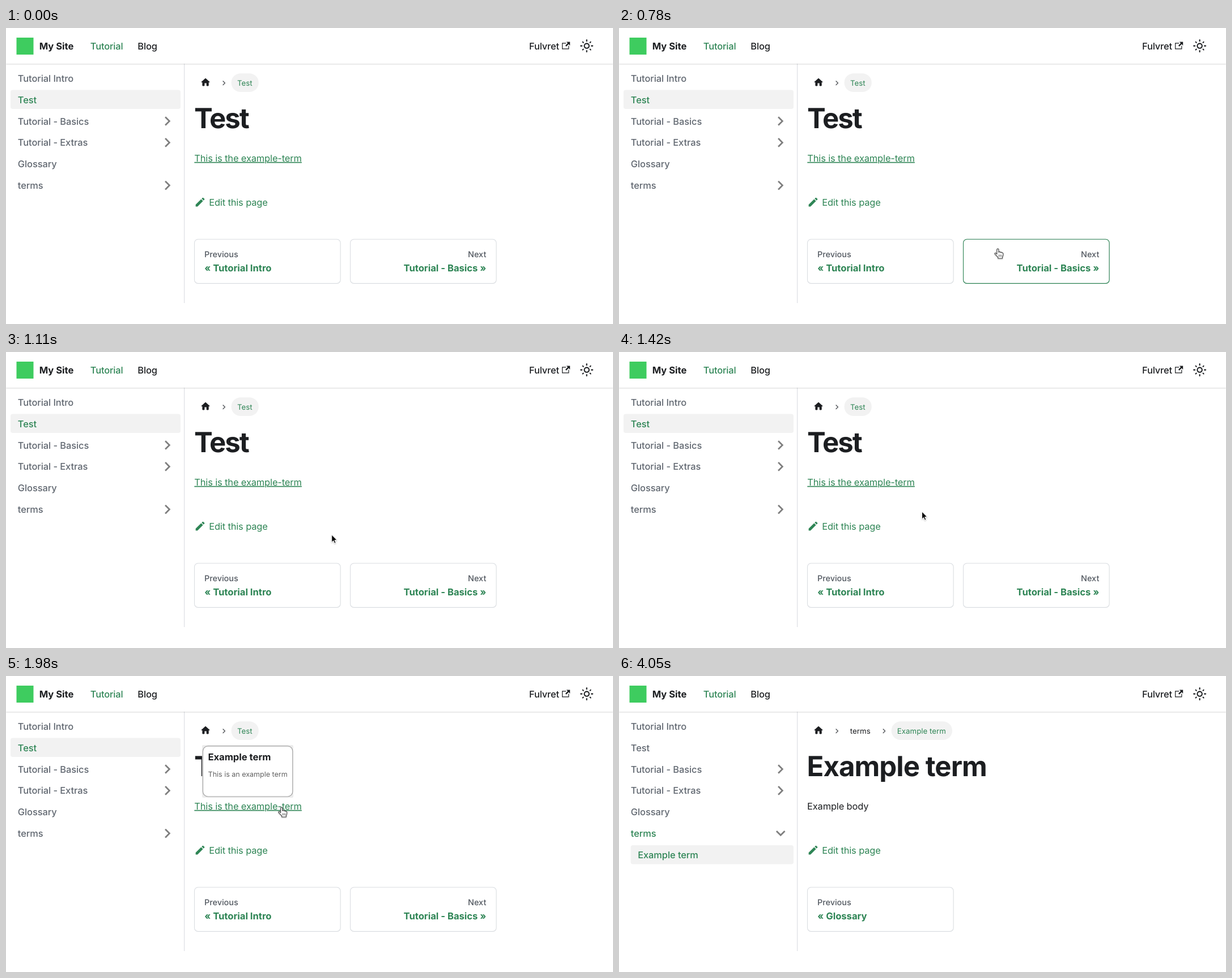
Recreate the animation shown at these times as an HTML page. Size 1071x523 px, loop 5.2 s.

```html
<!DOCTYPE html>
<html lang="en">
<head>
<meta charset="utf-8">
<title>Docs term preview</title>
<style>
  html, body { margin: 0; width: 100%; height: 100%; overflow: hidden; background: #fff; }
  svg { display: block; width: 100%; height: 100%; }
  text {
    font: 400 16.4px Inter, "Liberation Sans", sans-serif;
    font-optical-sizing: none;
    letter-spacing: -.007em;
    fill: #1c1e21;
    text-rendering: geometricPrecision;
  }
  .medium { font-weight: 500; }
  .bold { font-weight: 700; font-size: 16.6px; letter-spacing: 0; }
  .menu { font-weight: 500; letter-spacing: -.003em; fill: #606770; }
  .crumb { font-size: 13.2px; letter-spacing: .005em; }
  .sub { font-size: 14.4px; font-weight: 500; letter-spacing: 0; fill: #525860; }
  .h1 { font-size: 49px; font-weight: 700; letter-spacing: -.018em; }
  .tight { letter-spacing: -.04em; }
  .note { font-size: 12.5px; letter-spacing: 0; fill: #606060; }
  .green { fill: #2e8555; }
  .link { text-decoration: underline; }
  .end { text-anchor: end; }
</style>
</head>
<body>
<svg id="stage" viewBox="0 0 1071 523" xmlns="http://www.w3.org/2000/svg"></svg>
<script>
const LOOP = 5200, PAGE_SWITCH = 3310, CURSOR_OUT = 4050;
const TICKS = [0, 710, 780, 870, 950, 1030, 1110, 1180, 1260, 1340, 1420, 1500, 1580, 1660, 1740, 1820, 1900, 1980];

// [time, x, y] of the pointer tip
const PATH = [
  [710, 690, 455], [780, 668.5, 391], [870, 640, 365], [950, 612, 347], [1110, 574.7, 323],
  [1180, 570, 318], [1260, 565, 313], [1580, 504, 251], [1740, 489.3, 236.3], [1820, 486.3, 233]
];
const HOVER = [[710, .3], [780, 1], [870, .7], [1030, 0]];
const TOOLTIP = [[1820, 0], [1900, .5], [1980, 1]];

const text = (x, y, str, cls = '') => `<text x="${x}" y="${y}" class="${cls}">${str}</text>`;
const box = (x, y, w, h, r, attrs) => `<rect x="${x}" y="${y}" width="${w}" height="${h}" rx="${r}" ${attrs}/>`;
const fillBox = (x, y, w, h, r) => box(x, y, w, h, r, 'fill="#f2f2f2"');
const icon = (x, y, scale, d, color) =>
  `<path transform="translate(${x} ${y}) scale(${scale})" d="${d}" fill="${color}"/>`;

const rowY = i => 94.8 + i * 37.86;
const menuItem = (i, str, cls = '') => text(20.8, rowY(i), str, 'menu ' + cls);
const arrow = (i, turn = 0) =>
  `<path transform="translate(285.2 ${rowY(i) - 6}) rotate(${turn}) scale(1.38) translate(-12.3 -12)"
    d="M8.59 16.59L13.17 12 8.59 7.41 10 6l6 6-6 6z" fill="#7f7f7f"/>`;
const crumbArrow = x =>
  `<path d="M${x} 93.4l3.7 3.8-3.7 3.8" fill="none" stroke="#55585c" stroke-width="1.4"/>`;
const card = (x, attrs = 'stroke="#dadde1"') =>
  box(x, 373.2, 257.6, 78.2, 6.5, 'fill="none" stroke-width="1.1" ' + attrs);
const prevCard = str => card(332.5) + text(350, 405, 'Previous', 'sub') + text(350.3, 430, '« ' + str, 'bold green');

function sun() {
  let rays = '';
  for (let i = 0; i < 8; i++)
    rays += `<path d="M8 0H${i % 2 ? 9.4 : 10}" transform="rotate(${i * 45})"/>`;
  return `<g transform="translate(1024.6 31.6) scale(1.05)" fill="none" stroke="#1c1e21" stroke-width="2"
    stroke-linecap="round"><circle r="4"/>${rays}</g>`;
}

const navbar =
  box(0, 0, 1071, 63, 0, 'fill="#fff" filter="url(#navShadow)"') +
  box(18.5, 17, 30, 30, 0, 'fill="#3ecc5f"') +
  text(58.7, 38, 'My Site', 'bold') +
  text(148.8, 38, 'Tutorial', 'medium green') +
  text(232.3, 38, 'Blog', 'medium') +
  text(976, 38, 'Fulvret', 'medium end') +
  icon(981, 23.9, .59, 'M21 13v10H0V4h12v2H2v15h17v-8zm3-12H13.012l4.035 4-6.977 7.07 2.828 2.828 6.977-7.07L24 12z', '#1c1e21') +
  sun();

const shared =
  '<path d="M314.6 63V486" stroke="#dadde1" stroke-width="1.1"/>' +
  navbar +
  menuItem(0, 'Tutorial Intro') +
  menuItem(2, 'Tutorial - Basics') + arrow(2) +
  menuItem(3, 'Tutorial - Extras') + arrow(3) +
  menuItem(4, 'Glossary') +
  icon(342.3, 86.2, .81, 'M10 19v-5h4v5c0 .55.45 1 1 1h3c.55 0 1-.45 1-1v-7h1.7c.46 0 .68-.57.33-.87L12.67 3.6c-.38-.34-.96-.34-1.34 0l-8.36 7.53c-.34.3-.13.87.33.87H5v7c0 .55.45 1 1 1h3c.55 0 1-.45 1-1z', '#1c1e21') +
  crumbArrow(382.6) +
  icon(332, 297, .525, 'M34.5 11.7l-3 3.1-6.3-6.3 3.1-3q.5-.5 1.2-.5t1.1.5l3.9 3.9q.5.4.5 1.1t-.5 1.2zM5 28.8l18.4-18.5 6.3 6.3L11.3 35H5z', '#2e8555') +
  text(358.2, 314, 'Edit this page', 'green');

const tooltip =
  box(346, 122, 161, 93, 2, 'fill="#ececec" filter="url(#soft)"') +
  box(347.4, 123.8, 158.4, 89.2, 9, 'fill="#fff" fill-opacity=".985" stroke="#a2a2a2" stroke-width="1.2"') +
  text(356.4, 149.3, 'Example term', 'bold') +
  text(356.6, 178.4, 'This is an example term', 'note');

const testPage =
  fillBox(8, 109.5, 300, 33.6, 4) +
  menuItem(1, 'Test', 'green') +
  menuItem(5, 'terms') + arrow(5) +
  fillBox(397.5, 80.2, 48.3, 32.8, 16.4) +
  text(408, 101.7, 'Test', 'crumb green') +
  text(332, 177.4, 'Test', 'h1 tight') +
  text(332.3, 235.8, 'This is the example-term', 'green link') +
  prevCard('Tutorial Intro') +
  card(607.5) +
  card(607.5, 'id="hover" stroke="#2e8555"') +
  text(847.3, 405, 'Next', 'sub end') +
  text(847.3, 430, 'Tutorial - Basics »', 'bold green end') +
  `<g id="tooltip">${tooltip}</g>`;

const termPage =
  menuItem(1, 'Test') +
  menuItem(5, 'terms', 'green') + arrow(5, 90) +
  fillBox(20.6, 299, 287.4, 33.6, 4) +
  text(33.2, rowY(6), 'Example term', 'menu green') +
  text(407.8, 101.7, 'terms', 'crumb') +
  crumbArrow(465.8) +
  fillBox(480.6, 80.2, 107.4, 32.8, 16.4) +
  text(490.8, 101.7, 'Example term', 'crumb green') +
  text(331.6, 177.4, 'Example term', 'h1') +
  text(332, 235.8, 'Example body') +
  prevCard('Glossary');

const pointer =
  `<g id="cursor" filter="url(#cursorShadow)">
    <path id="arrow" d="M0 0V13.2L3 10.4L5.1 15.2L7.3 14.2L5.2 9.5H9.3Z" fill="#000" stroke="#fff" stroke-width="1"/>
    <g id="hand" transform="scale(.94)" fill="#fff" stroke="#454545" stroke-width="1.2" stroke-linejoin="round" stroke-linecap="round">
      <path d="M-1.8 9.3V.6C-1.8-1.5 1.5-1.5 1.5.6V5.5C2 4.3 4.5 4.4 4.7 6C5.3 5 7.4 5.3 7.6 6.8C8.6 6.2 10 6.8 10 8.4C10 11.5 9.3 13 8.5 14.5V17H.3V15C-1.5 13-3.5 11.5-5.5 9C-6.8 7.2-4.5 6.2-3.4 7.5Z"/>
      <path d="M1.9 10.5V13.7M4.3 10.5V13.7M6.7 10.5V13.7" stroke-width=".9"/>
    </g>
  </g>`;

const stage = document.getElementById('stage');
stage.innerHTML =
  `<defs>
    <filter id="navShadow" x="-5%" y="-20%" width="110%" height="140%">
      <feDropShadow dx="0" dy="1" stdDeviation="1" flood-opacity=".16"/></filter>
    <filter id="cursorShadow" x="-50%" y="-50%" width="200%" height="200%">
      <feDropShadow dx="0" dy="1" stdDeviation="1" flood-opacity=".3"/></filter>
    <filter id="soft"><feGaussianBlur stdDeviation=".7"/></filter>
  </defs>
  ${shared}<g id="testPage">${testPage}</g><g id="termPage">${termPage}</g>${pointer}`;

const el = id => document.getElementById(id);
const parts = Object.fromEntries(
  ['testPage', 'termPage', 'hover', 'tooltip', 'cursor', 'arrow', 'hand'].map(id => [id, el(id)]));
const show = (node, on) => node.setAttribute('display', on ? 'inline' : 'none');

// Linear value of one column of a key list
function at(keys, t, col = 1) {
  if (t <= keys[0][0]) return keys[0][col];
  for (let i = 1; i < keys.length; i++) {
    const a = keys[i - 1], b = keys[i];
    if (t < b[0]) return a[col] + (b[col] - a[col]) * (t - a[0]) / (b[0] - a[0]);
  }
  return keys[keys.length - 1][col];
}

function draw(t) {
  // The screen refreshes only at the tick times
  const tick = TICKS.filter(v => v <= t).pop();
  const onTerm = t >= PAGE_SWITCH;
  const isHand = tick === 780 || tick === 870 || tick >= 1820;

  show(parts.testPage, !onTerm);
  show(parts.termPage, onTerm);
  parts.hover.setAttribute('opacity', tick < 710 ? 0 : at(HOVER, tick));
  parts.tooltip.setAttribute('opacity', at(TOOLTIP, tick));

  show(parts.cursor, tick >= 710 && t < CURSOR_OUT);
  show(parts.hand, isHand);
  show(parts.arrow, !isHand);
  parts.cursor.setAttribute('transform', `translate(${at(PATH, tick)} ${at(PATH, tick, 2)})`);
}

const start = performance.now();
function loop() {
  draw((performance.now() - start) % LOOP);
  requestAnimationFrame(loop);
}
loop();
</script>
</body>
</html>
```
